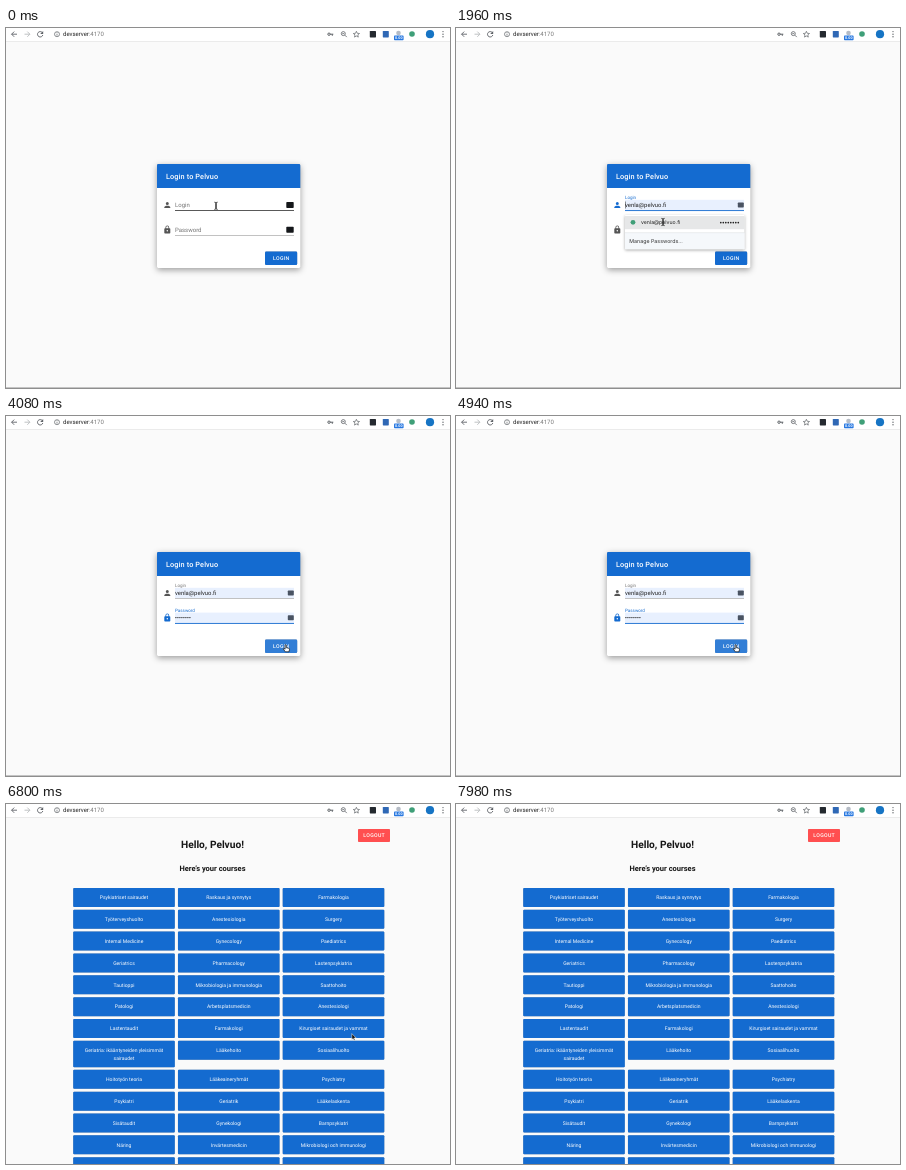
Recreate the animation shown at these times as an HTML page. Size 444 by 360 pixels, loop 8000 ms.

```html
<!DOCTYPE html>
<html lang="en">
<head>
<meta charset="utf-8">
<title>Login</title>
<style>
  html, body { margin: 0; width: 100%; height: 100%; overflow: hidden; background: #fafafa; }
  svg { display: block; width: 444px; height: 360px; }
  text { font-family: Roboto, sans-serif; text-rendering: geometricPrecision; white-space: pre; }
  .sys { font-family: Inter, sans-serif; }
  .mid { text-anchor: middle; }
  .medium { font-weight: 500; }
  .bold { font-weight: 700; }
  .card { filter: drop-shadow(0 2px 3px rgba(0,0,0,.38)); }
  .raised { filter: drop-shadow(0 .7px .7px rgba(0,0,0,.32)); }
  .popup { filter: drop-shadow(0 1px 1.5px rgba(0,0,0,.35)); }
</style>
</head>
<body>
<svg id="stage" viewBox="0 0 444 360"></svg>
<script>
const LOOP = 8000;
const BLUE = '#146bd0', INK = '#222', GREY = '#757575';
const BRAND = 'Pelvuo', EMAIL = 'venla@pelvuo.fi';

// Moments of the story, in ms
const FOCUS = 900, PREVIEW = 1700, PICK = 2120, TO_PASSWORD = 2350, HOVER = 3880, ENTER = 5000;

const COURSES = [
  ['Psykiatriset sairaudet', 'Raskaus ja synnytys', 'Farmakologia'],
  ['Työterveyshuolto', 'Anestesiologia', 'Surgery'],
  ['Internal Medicine', 'Gynecology', 'Paediatrics'],
  ['Geriatrics', 'Pharmacology', 'Lastenpsykiatria'],
  ['Tautioppi', 'Mikrobiologia ja immunologia', 'Saattohoito'],
  ['Patologi', 'Arbetsplatsmedicin', 'Anestesiologi'],
  ['Lastentaudit', 'Farmakologi', 'Kirurgiset sairaudet ja vammat'],
  ['Geriatria: ikääntyneiden yleisimmät|sairaudet', 'Lääkehoito', 'Sosiaalihuolto'],
  ['Hoitotyön teoria', 'Lääkeaineryhmät', 'Psychiatry'],
  ['Psykiatri', 'Geriatrik', 'Lääkelaskenta'],
  ['Sisätaudit', 'Gynekologi', 'Barnpsykiatri'],
  ['Näring', 'Invärtesmedicin', 'Mikrobiologi och immunologi'],
  ['', '', '']
];

const rect = (x, y, w, h, fill, more = '') =>
  `<rect x="${x}" y="${y}" width="${w}" height="${h}" fill="${fill}" ${more}/>`;
const text = (x, y, size, fill, str, more = '') =>
  `<text x="${x}" y="${y}" font-size="${size}" fill="${fill}" ${more}>${str}</text>`;
const circle = (x, y, r, fill, more = '') =>
  `<circle cx="${x}" cy="${y}" r="${r}" fill="${fill}" ${more}/>`;
const stroke = (d, color, width = 0.9) =>
  `<path d="${d}" fill="none" stroke="${color}" stroke-width="${width}"/>`;
const group = (id, body, more = '') => `<g id="${id}" ${more}>${body}</g>`;
const dots = (x, y, pitch, r) =>
  Array.from({ length: 8 }, (_, i) => circle(x + i * pitch, y, r, INK)).join('');
const button = (x, y, w, h, fill, label) =>
  rect(x, y, w, h, fill, 'rx="1.3" class="raised"') +
  text(x + w / 2 + 0.2, y + h / 2 + 1.8, 5.2, '#fff', label, 'class="mid medium" letter-spacing=".3"');

function toolbar() {
  const grey = '#5f6368';
  return rect(0, 0, 444, 13, '#fff') + rect(0, 13, 444, 0.6, '#e2e2e2') +
    stroke('M11 6.2H5.6M8.2 3.6L5.6 6.2L8.2 8.8', grey) +
    stroke('M18.5 6.2H23.9M21.3 3.6L23.9 6.2L21.3 8.8', '#b9bbbe') +
    stroke('M36.3 4.6A2.7 2.7 0 1 0 36.8 7', grey) + `<path d="M37.2 3V6H34.2Z" fill="${grey}"/>` +
    circle(51, 6.2, 2.5, 'none', `stroke="${grey}" stroke-width=".7"`) + stroke('M51 5.8V7.7M51 4.4V5.1', grey, 0.7) +
    text(57, 8.4, 6, INK, 'devserver<tspan fill="#777">:4170</tspan>') +
    circle(323, 6.2, 1.2, 'none', `stroke="${grey}" stroke-width="1"`) + stroke('M324 6.2H327.3M326.3 6.2V7.8', grey, 1) +
    circle(337.3, 5.6, 2, 'none', `stroke="${grey}" stroke-width=".8"`) + stroke('M338.8 7.1L340.8 9.1M336.3 5.6H338.3', grey, 0.8) +
    `<path d="M350.4 3.3l.9 2 2.2.2-1.7 1.4.5 2.2-1.9-1.1-1.9 1.1.5-2.2-1.7-1.4 2.2-.2z" fill="none" stroke="${grey}" stroke-width=".7"/>` +
    rect(363.8, 3, 6.2, 6.4, '#252a30', 'rx=".6"') +
    rect(376.8, 3, 6, 6.4, '#2f68b5', 'rx=".6"') +
    circle(392.5, 5, 2.3, '#b5bcc6') + rect(388, 7.6, 9.6, 4.6, '#2878e0', 'rx=".8"') +
    text(392.8, 11.3, 3.7, '#fff', '0.00', 'class="mid bold"') +
    circle(406, 6, 2.8, '#3f9f78') + circle(424, 6.2, 4.1, '#1674c4') +
    [3.6, 6.2, 8.8].map(y => circle(437, y, 0.7, grey)).join('');
}

function field(id, y, label, icon, value) {
  return group(id + 'Fill', rect(169, y - 5.2, 119, 10.4, '#e8f0fe') + value) +
    `<path id="${id}Icon" d="${icon}" fill-rule="evenodd" transform="translate(156.8 ${y - 4.6}) scale(.375)"/>` +
    `<text id="${id}Label" x="0" y="0">${label}</text>` +
    `<rect id="${id}Line" x="169" width="119"/>` +
    `<rect id="${id}Badge" rx=".7"/>`;
}

function loginPage() {
  const person = 'M12 4a4 4 0 0 1 0 8 4 4 0 0 1 0-8m0 10c4.42 0 8 1.79 8 4v2H4v-2c0-2.21 3.58-4 8-4z';
  const lock = 'M12 17a2 2 0 0 0 0-4 2 2 0 0 0 0 4m6-9a2 2 0 0 1 2 2v10a2 2 0 0 1-2 2H6a2 2 0 0 1-2-2V10a2 2 0 0 1 2-2h1V6a5 5 0 0 1 10 0v2h1m-6-5a3 3 0 0 0-3 3v2h6V6a3 3 0 0 0-3-3z';
  const popup = rect(169, 187, 119.5, 34.2, '#fff', 'rx=".8" class="popup"') +
    group('row', rect(169, 188, 119.5, 13.2, '#e6e7e8')) +
    circle(177, 194.3, 2.4, '#3f9f78') +
    text(185, 196.3, 5.2, INK, EMAIL, 'class="sys"') + dots(264.8, 194.6, 2.5, 0.85) +
    rect(169, 204.8, 119.5, 16.4, '#f5f8fb') + rect(169, 204.6, 119.5, 0.5, '#d8dadd') +
    text(173.3, 215, 5.3, '#333', 'Manage Passwords...', 'class="sys"');
  return rect(0, 359, 444, 1, '#c4c4c4') +
    rect(151, 136, 143.3, 104, '#fff', 'rx="1.4" class="card"') +
    `<path d="M151 160V137.4a1.4 1.4 0 0 1 1.4-1.4H292.9a1.4 1.4 0 0 1 1.4 1.4V160Z" fill="${BLUE}" class="raised"/>` +
    text(160, 150.8, 7.3, '#fff', 'Login to ' + BRAND, 'class="medium" letter-spacing=".12"') +
    field('user', 177, 'Login', person, text(169, 179.1, 5.9, INK, EMAIL)) +
    field('pass', 201.8, 'Password', lock, dots(169.9, 201.6, 2, 0.72)) +
    rect(0, 0, 0.5, 7, INK, 'id="caret"') +
    button(259, 223.5, 32.2, 13.6, BLUE, 'LOGIN') +
    group('hover', rect(259, 223.5, 32.2, 13.6, '#fff', 'rx="1.3" opacity=".13"')) +
    group('popup', popup);
}

function coursePage() {
  const grid = COURSES.map((row, i) => {
    const top = 83.9 + 21.85 * i + (i > 7 ? 7.1 : 0);
    return row.map((name, col) => {
      const lines = name.split('|'), x = 67.2 + 104.75 * col;
      const h = lines.length > 1 ? 26.4 : 19;
      const first = top + h / 2 + 1.8 - (lines.length - 1) * 3.7;
      return rect(x, top, 101.6, h, BLUE, 'rx="1" class="raised"') +
        lines.map((s, k) => text(x + 50.8, first + k * 7.4, 5.05, '#fff', s, 'class="mid"')).join('');
    }).join('');
  }).join('');
  return button(352, 25, 32, 13, '#ff4f50', 'LOGOUT') +
    text(206.5, 44.2, 10.2, '#161616', `Hello, ${BRAND}!`, 'class="mid bold"') +
    text(206.5, 67, 7.5, '#161616', 'Here’s your courses', 'class="mid bold"') + grid;
}

const cursors =
  group('beam', stroke('M-1.6 -3.6Q0 -3.6 0 -2.6V2.6Q0 3.6 -1.6 3.6M1.6 -3.6Q0 -3.6 0 -2.6V2.6Q0 3.6 1.6 3.6', '#111', 0.8)) +
  group('arrow', '<path d="M0 0V6L1.4 4.8L2.3 6.9L3.3 6.4L2.4 4.4H4.3Z" fill="#111" stroke="#fff" stroke-width=".5"/>') +
  group('hand', '<path d="M-.9 -3q.7-.8 1.2 0V-.3l2.6.6q.7.3.6 1L3 3.8H-.6L-2.8 .9q.2-.9 1.1-.3l.8.6Z" fill="#fff" stroke="#111" stroke-width=".7"/>');

document.getElementById('stage').innerHTML =
  rect(0, 0, 444, 360, '#fafafa') + group('login', loginPage()) + group('courses', coursePage()) +
  toolbar() + group('cursor', cursors);

const $ = id => document.getElementById(id);
const show = (id, on) => $(id).setAttribute('visibility', on ? 'inherit' : 'hidden');
const set = (id, attrs) => Object.entries(attrs).forEach(([k, v]) => $(id).setAttribute(k, v));
const clamp = v => Math.max(0, Math.min(1, v));
const ease = v => v * v * (3 - 2 * v);

// time, x, y of the pointer
const PATH = [
  [0, 210, 177.8], [1150, 210, 177.8], [1600, 207, 194], [2140, 207, 194], [2320, 230, 202],
  [2380, 230, 202], [2660, 360, 209.6], [3450, 360, 209.6], [3950, 280, 232],
  [5080, 280, 232], [5450, 345.8, 229.6], [7350, 345.8, 229.6], [7700, 350, 368], [8000, 350, 368]
];

function pointer(t) {
  const i = PATH.findIndex(p => p[0] > t);
  const [t0, x0, y0] = PATH[i - 1], [t1, x1, y1] = PATH[i];
  const k = ease((t - t0) / (t1 - t0));
  return [x0 + (x1 - x0) * k, y0 + (y1 - y0) * k];
}

function drawField(id, y, { filled, focused, hovered, floatAt, t }) {
  const k = ease(clamp((t - floatAt) / 250));
  const thick = focused ? 0.9 : hovered ? 0.75 : 0.5;
  show(id + 'Fill', filled);
  set(id + 'Icon', { fill: focused ? BLUE : '#555' });
  set(id + 'Label', {
    fill: focused ? BLUE : GREY, 'font-size': 6 - 1.5 * k,
    transform: `translate(169 ${y + 2 - 8 * k})`
  });
  set(id + 'Line', { y: y + 5.6 - thick / 2, height: thick, fill: focused ? BLUE : hovered ? INK : '#858585' });
  set(id + 'Badge', filled
    ? { x: 281.8, y: y - 2.5, width: 6, height: 5, fill: '#4a5362' }
    : { x: 280.3, y: y - 3, width: 7.4, height: 6, fill: '#15171a' });
}

function render(t) {
  const inside = t >= ENTER;
  show('login', !inside);
  show('courses', inside);

  const onPassword = t >= TO_PASSWORD;
  const onLogin = t >= FOCUS && !onPassword;
  drawField('user', 177, { t, filled: t >= PREVIEW, focused: onLogin, hovered: t < FOCUS, floatAt: FOCUS });
  drawField('pass', 201.8, { t, filled: t >= PREVIEW, focused: onPassword, hovered: false, floatAt: PREVIEW });

  const caretX = onPassword ? 185.4 : t >= PICK ? 208.5 : 169;
  const blink = (t - (onPassword ? TO_PASSWORD : FOCUS)) % 1000 < 500;
  set('caret', { x: caretX, y: onPassword ? 198.3 : 173.5 });
  show('caret', t >= FOCUS && blink);
  show('popup', t >= FOCUS && t < PICK);
  show('row', t >= PREVIEW - 200);
  show('hover', t >= HOVER);

  const [x, y] = pointer(t);
  set('cursor', { transform: `translate(${x} ${y})` });
  const hand = t >= HOVER && t < 5120, beam = t < 2440;
  show('hand', hand);
  show('beam', beam);
  show('arrow', !hand && !beam);
}

const start = performance.now();
function tick() {
  render((performance.now() - start) % LOOP);
  requestAnimationFrame(tick);
}
tick();
</script>
</body>
</html>
```
